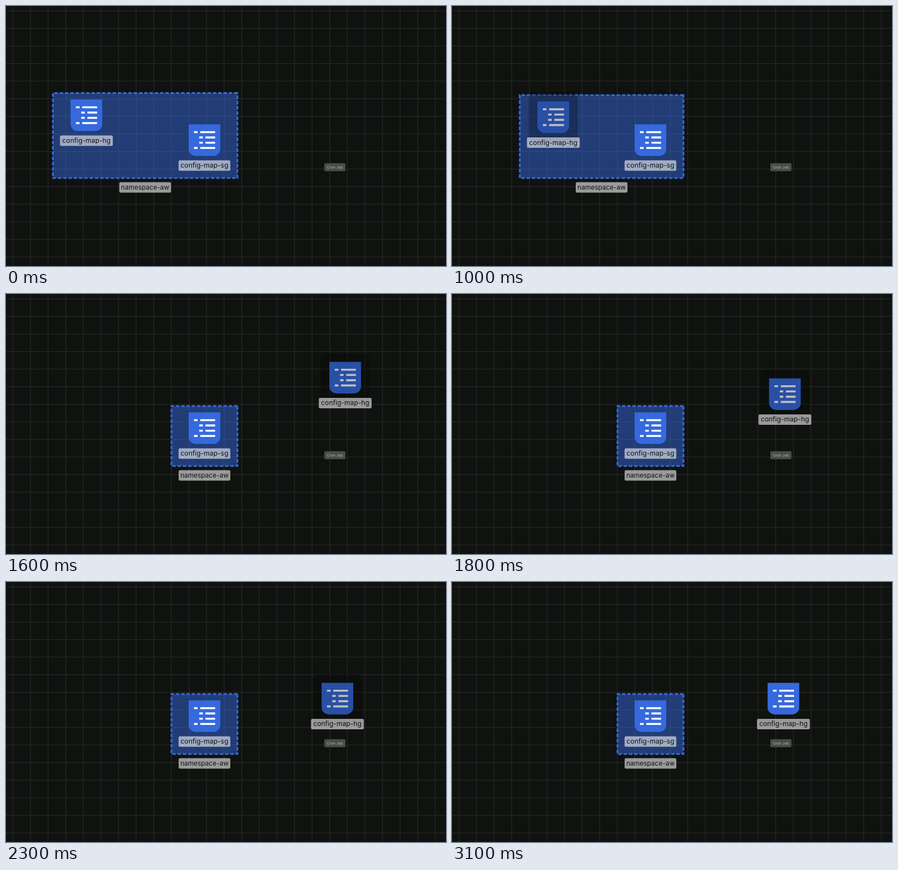
An HTML page that plays this animation: 800x473 px, repeating every 4600 ms.

```html
<!DOCTYPE html>
<html lang="en">
<head>
<meta charset="utf-8">
<title>Namespace drag</title>
<style>
  html, body { margin: 0; width: 100%; height: 100%; overflow: hidden; background: #0f120f; }
  svg { display: block; width: 800px; height: 473px; }
  text { font-family: Inter, "Noto Sans", sans-serif; text-anchor: middle; }
  .label rect { fill: #f5f5f5; fill-opacity: .6; }
  .label text { font-size: 12.25px; fill: #101210; }
</style>
</head>
<body>
<svg viewBox="0 0 800 473">
  <defs>
    <pattern id="grid" width="32" height="32" x="12" y="8" patternUnits="userSpaceOnUse">
      <path d="M.6 0V32M0 .6H32" stroke="#252826" stroke-width="1.1"/>
    </pattern>
    <g id="icon">
      <path d="M-28.8 0H28.8V44.5A13 13 0 0 1 15.8 57.5H-15.8A13 13 0 0 1 -28.8 44.5Z" fill="#3669de"/>
      <g stroke="#fff" stroke-width="3.6">
        <path id="outerRow" d="M-19 14.3h6.6m4.8 0h27"/>
        <path id="innerRow" d="M-9.4 23.9h6.4m4.8 0h17.6"/>
        <use href="#innerRow" y="9.6"/>
        <use href="#outerRow" y="28.7"/>
      </g>
    </g>
  </defs>
  <rect width="800" height="473" fill="#0f120f"/>
  <rect width="800" height="473" fill="url(#grid)"/>
  <path id="space" fill="#3669de" fill-opacity=".5" stroke="#3669de" stroke-width="3.2" stroke-dasharray="6.4 3.2"/>
  <g id="spaceLabel" class="label">
    <rect x="-47" width="94" height="19" rx="2.5"/>
    <text y="13.6" style="font-size:12px">namespace-aw</text>
  </g>
  <g transform="translate(598 286)">
    <rect x="-19.2" width="38.4" height="14.6" rx="2" fill="#4b4d4b"/>
    <text y="10" font-size="6.7" fill="#b9bbb9">Cron Job</text>
  </g>
  <g transform="translate(360.8 215.2)">
    <use href="#icon"/>
    <g class="label">
      <rect x="-47" y="65.5" width="94" height="19" rx="2.5"/>
      <text y="79.1">config-map-sg</text>
    </g>
  </g>
  <g id="dragged">
    <use href="#icon"/>
    <rect id="shade" x="-44.8" y="-16" width="89.6" height="89.6" rx="12" fill="#000" opacity=".25"/>
    <g class="label">
      <rect x="-48" y="65.5" width="96" height="19" rx="2.5"/>
      <text y="79.1">config-map-hg</text>
    </g>
  </g>
</svg>
<script>
  const LOOP = 4600, STEP = 100;
  const GRAB = 800, LEAVE = 1200, RETURN = 1400, SETTLE = 2000, DROP = 2600;
  const BOX = { left: 300.9, top: 203.9, right: 420.8, bottom: 313 };
  const HOME = { x: 146.2, y: 170 };
  const AWAY = { x: 640, y: 93.4 };
  const REST = { x: 602.6, y: 183.4 };

  const byId = id => document.getElementById(id);
  const move = (el, x, y) => el.setAttribute("transform", `translate(${x} ${y})`);
  const lerp = (a, b, k) => a + (b - a) * k;
  const progress = (t, from, to) => Math.min(1, Math.max(0, (t - from) / (to - from)));
  const easeIn = (k, power) => k ** power;
  const easeOut = (k, power) => 1 - (1 - k) ** power;

  function positionAt(t) {
    if (t < RETURN) {
      const k = progress(t, GRAB, LEAVE), pull = easeIn(k, 3.7);
      const sag = 38 * k * (1 - k);
      return { x: lerp(HOME.x, AWAY.x, pull), y: lerp(HOME.y, AWAY.y, pull) + sag };
    }
    const k = progress(t, RETURN, SETTLE);
    return { x: lerp(AWAY.x, REST.x, easeOut(k, 2.4)), y: lerp(AWAY.y, REST.y, k) };
  }

  function render(time) {
    const t = Math.floor(time % LOOP / STEP) * STEP;
    const { x, y } = positionAt(t);
    const inside = t < LEAVE;
    const left = inside ? Math.min(BOX.left, x - 61) : BOX.left;
    const top = inside ? Math.min(BOX.top, y - 11.6) : BOX.top;

    // The dashes run counter-clockwise from the top right corner
    byId("space").setAttribute("d", `M${BOX.right} ${top}H${left}V${BOX.bottom}H${BOX.right}Z`);
    move(byId("spaceLabel"), (left + BOX.right) / 2, 320.6);
    move(byId("dragged"), x, y);
    byId("shade").setAttribute("visibility", t >= GRAB && t < DROP ? "visible" : "hidden");
  }

  const start = performance.now();
  function tick() {
    render(performance.now() - start);
    requestAnimationFrame(tick);
  }
  tick();
</script>
</body>
</html>
```
